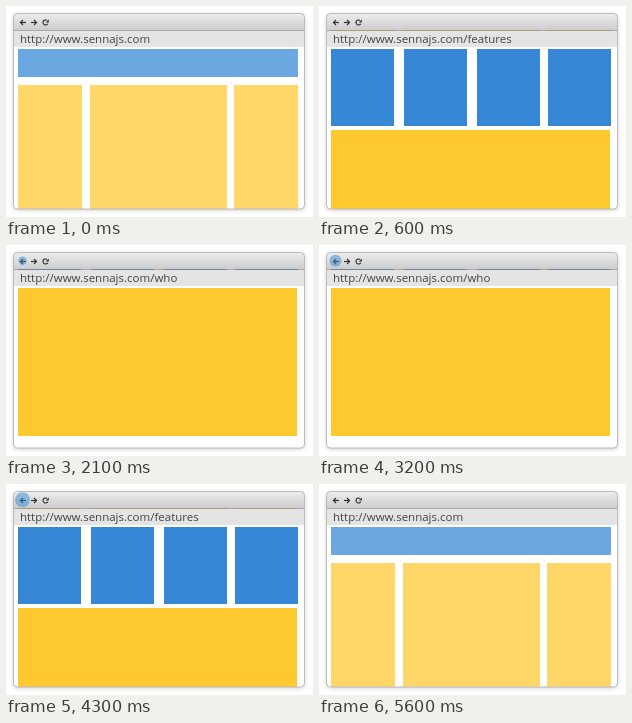
Write an HTML page with a canvas that moves like this. It is 307x211 px and loops after 6600 ms.

```html
<!DOCTYPE html>
<html>
<head>
<meta charset="utf-8">
<style>
html, body { margin: 0; width: 100%; height: 100%; overflow: hidden; background: #fff; }
canvas { display: block; }
</style>
</head>
<body>
<canvas id="stage" width="307" height="211"></canvas>
<script>
const ctx = document.getElementById('stage').getContext('2d');
const LOOP = 6600, STEP = 100, STEPS = 6;
const urls = ['', '/features', '/who'].map(path => 'http://www.sennajs.com' + path);
const stops = [0, 219, 300];

// Page changes: start time, page left, page entered
const moves = [[100, 0, 1], [1600, 1, 2], [3800, 2, 1], [5100, 1, 0]];

// Page blocks: colour, top, bottom, [left, right] columns
const blocks = [
  ['#6ba7e0', 43, 71, [[12, 292]]],
  ['#ffd768', 79, 256, [[12, 76], [84, 221], [228, 292]]],
  ['#3687d6', 262, 339, [[12, 75], [85, 148], [158, 221], [229, 292]]],
  ['#fec82f', 343, 491, [[12, 291]]]
];

// Touch marker: start time, radius, opacity
const touches = [
  [0, 0, 0], [2100, 4.2, .5], [3200, 6, .5], [3300, 7.5, .5], [3500, 7.5, .65],
  [3800, 7.5, .5], [4400, 7.5, .65], [4600, 7.5, .5], [5600, 0, 0]
];

function rect(color, x, y, w, h) {
  ctx.fillStyle = color;
  ctx.fillRect(x, y, w, h);
}

function line(...points) {
  ctx.beginPath();
  points.forEach(([x, y]) => ctx.lineTo(x, y));
  ctx.stroke();
}

function frame(radius = 4) {
  ctx.beginPath();
  ctx.roundRect(7.5, 7.5, 291, 195.5, radius);
}

function stateAt(t) {
  const [start, from, to] = moves.findLast(m => t >= m[0]) || [100, 0, 1];
  const k = Math.max(0, Math.min(STEPS, (t - start) / STEP + 1));
  const gap = stops[to] - stops[from];
  const scroll = stops[from] + Math.sign(gap) * Math.round(Math.abs(gap) * k / STEPS);
  return { from, to, scroll, p: k / STEPS };
}

function drawPage(scroll) {
  ctx.save();
  ctx.beginPath();
  ctx.rect(8, 24, 290, 179);
  ctx.clip();
  for (const [color, top, bottom, columns] of blocks)
    for (const [left, right] of columns)
      rect(color, left, top - scroll, right - left, bottom - top);
  ctx.restore();
}

function drawToolbar() {
  const shade = ctx.createLinearGradient(0, 8, 0, 24);
  shade.addColorStop(0, '#ececec');
  shade.addColorStop(1, '#cdcdcd');
  ctx.save();
  frame();
  ctx.clip();
  rect(shade, 7, 7, 292, 17);
  rect('rgba(135,135,135,.7)', 7, 24, 292, 1);
  ctx.restore();
  rect('#e4e4e4', 8, 25, 291, 16);

  ctx.strokeStyle = ctx.fillStyle = '#333';
  ctx.lineWidth = 1.2;
  line([14.5, 16.5], [20, 16.5]);
  line([17, 14], [14.5, 16.5], [17, 19]);
  line([25, 16.5], [30.5, 16.5]);
  line([28, 14], [30.5, 16.5], [28, 19]);
  ctx.beginPath();
  ctx.arc(39.5, 16.5, 2.5, .5, 5.4);
  ctx.stroke();
  ctx.beginPath();
  ctx.moveTo(42.8, 13.5);
  ctx.lineTo(42.8, 16.5);
  ctx.lineTo(39.8, 16.5);
  ctx.fill();
}

function drawUrl(text, alpha) {
  ctx.globalAlpha = alpha;
  ctx.fillStyle = '#444';
  ctx.font = '11.5px "Open Sans", sans-serif';
  ctx.fillText(text, 14, 37);
  ctx.globalAlpha = 1;
}

function drawTouch(t, p) {
  const [, radius, alpha] = touches.findLast(m => t >= m[0]);
  const fade = t >= 5100 ? 1 - p : 1;
  ctx.fillStyle = `rgba(54,135,214,${alpha * fade})`;
  ctx.beginPath();
  ctx.arc(16.5, 15.7, radius, 0, 7);
  ctx.fill();
}

function draw(now) {
  const t = Math.floor(now % LOOP / STEP) * STEP;
  const { from, to, scroll, p } = stateAt(t);
  rect('#fff', 0, 0, 307, 211);

  ctx.save();
  ctx.shadowColor = 'rgba(0,0,0,.22)';
  ctx.shadowBlur = 4;
  ctx.shadowOffsetY = 1;
  ctx.fillStyle = '#fff';
  frame();
  ctx.fill();
  ctx.restore();

  drawPage(scroll);
  drawToolbar();
  drawUrl(urls[from], 1 - p);
  drawUrl(urls[to], p);
  drawTouch(t, p);

  ctx.strokeStyle = '#bcbcbc';
  ctx.lineWidth = 1;
  frame();
  ctx.stroke();
}

const begin = performance.now();
function tick() {
  draw(performance.now() - begin);
  requestAnimationFrame(tick);
}
tick();
</script>
</body>
</html>
```
